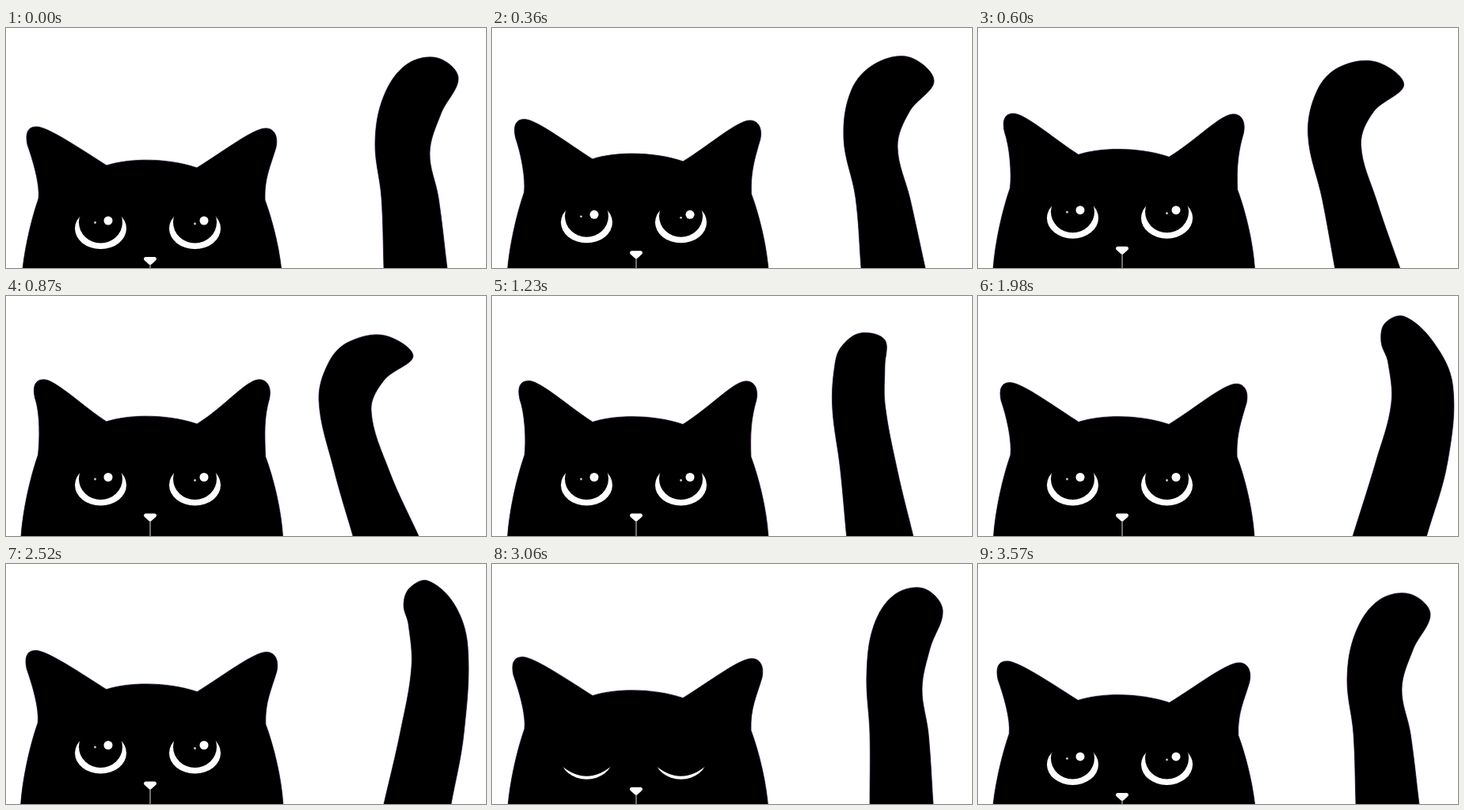
These frames come from a looping animation (606x304 px, 3.6 s). An HTML page with a canvas:

```html
<!DOCTYPE html>
<html lang="en">
<head>
<meta charset="utf-8">
<title>Peeking cat</title>
<style>
  html, body { margin: 0; width: 100%; height: 100%; overflow: hidden; background: #fff; }
  canvas { display: block; }
</style>
</head>
<body>
<canvas id="stage" width="606" height="304"></canvas>
<script>
const ctx = document.getElementById('stage').getContext('2d');
const LOOP = 3600, STEP = 30;

// Monotone cubic through keys, at rest at both ends.
function sample(times, vals, t) {
  const last = times.length - 1;
  const slope = i => (vals[i + 1] - vals[i]) / (times[i + 1] - times[i]);
  const tangent = i => {
    if (i === 0 || i === last) return 0;
    const a = slope(i - 1), b = slope(i);
    return a * b > 0 ? 2 * a * b / (a + b) : 0;
  };
  let i = 0;
  while (i < last - 1 && t >= times[i + 1]) i++;
  const h = times[i + 1] - times[i], u = (t - times[i]) / h, v = 1 - u;
  return v * v * (1 + 2 * u) * vals[i] + u * v * v * h * tangent(i)
       + u * u * (3 - 2 * u) * vals[i + 1] - u * u * v * h * tangent(i + 1);
}

// Tail outline: left base x, points up the left side, round the tip, down, right base x.
const rest = [477, 474,215, 466,145, 477,86, 506,46, 545,38, 571,63, 549,109, 535,158, 546,215, 557];
const poses = [
  rest,
  [466, 459,215, 444,140, 454,78, 484,45, 527,37, 558,67, 527,106, 512,150, 528,217, 547],
  [438, 414,220, 395,132, 408,83, 433,58, 478,50, 514,76, 477,107, 461,145, 484,222, 521],
  [461, 474,215, 478,150, 470,94, 456,68, 460,42, 488,33, 527,68, 547,128, 552,220, 548],
  [474, 503,210, 523,135, 519,82, 511,57, 516,34, 540,25, 577,58, 601,112, 594,210, 567],
  [477, 498,212, 512,130, 508,76, 502,52, 509,31, 532,21, 566,51, 583,105, 578,215, 562],
  [477, 477,215, 473,140, 482,78, 508,39, 545,31, 569,58, 553,107, 543,158, 551,215, 557],
  rest
];
const poseTimes = [0, 360, 870, 1560, 2040, 2520, 3060, LOOP];
const tracks = rest.map((_, i) => poses.map(p => p[i]));

const headTimes = [0, 360, 870, 1560, 2520, 3060, LOOP];
const earKeys = [0, .3, 1, .5, 0, 0, 0];
const breathKeys = [1, 1.003, 1.004, .996, 1.006, 1, 1.012];
const liftTimes = [0, 360, 720, 2520, 3060, LOOP];
const liftKeys = [0, -7.7, -14.5, -14.5, -7.3, 0];
const blinkTimes = [0, 2880, 3030, 3090, 3240, LOOP];
const blinkKeys = [0, 0, 1, 1, 0, 0];

function fur(path) {
  ctx.fillStyle = '#000';
  ctx.strokeStyle = '#230532';
  ctx.lineWidth = .7;
  ctx.fill(path);
  ctx.stroke(path);
}

function drawTail(t) {
  const v = tracks.map(track => sample(poseTimes, track, t));
  const pts = [[v[0], 304]];
  for (let i = 1; i < v.length - 1; i += 2) pts.push([v[i], v[i + 1]]);
  pts.push([v[v.length - 1], 304]);

  const path = new Path2D();
  const at = i => pts[Math.max(0, Math.min(pts.length - 1, i))];
  path.moveTo(v[0], 320);
  path.lineTo(...pts[0]);
  for (let i = 0; i < pts.length - 1; i++) {
    const [a, b, c, d] = [at(i - 1), at(i), at(i + 1), at(i + 2)];
    // Tangents scaled by chord length keep uneven spacing smooth.
    const len = (p, q) => Math.hypot(q[0] - p[0], q[1] - p[1]);
    const l0 = len(a, b), l1 = len(b, c), l2 = len(c, d);
    const k0 = l1 / (l0 + l1) / 3, k1 = l1 / (l1 + l2) / 3;
    const f0 = l0 ? k0 * 1.08 : k0, f1 = l2 ? k1 * 1.08 : k1;
    path.bezierCurveTo(
      b[0] + (c[0] - a[0]) * f0, b[1] + (c[1] - a[1]) * f0,
      c[0] - (d[0] - b[0]) * f1, c[1] - (d[1] - b[1]) * f1, c[0], c[1]);
  }
  path.lineTo(v[v.length - 1], 320);
  path.closePath();
  fur(path);
}

function drawHead(t) {
  const ear = sample(headTimes, earKeys, t);
  const breath = sample(headTimes, breathKeys, t);
  const left = (x, y) => `${x + 10 * ear},${y - 4 * ear} `;
  const right = (x, y) => `${x - 9 * ear},${y - 6 * ear} `;
  const path = new Path2D(
    'M18,340 L19.5,320 C22,285 31,245 41,216 ' +
    'C43,198 ' + left(34, 168) + left(27, 148) +
    'C' + left(24, 134) + left(27, 125) + left(38, 125) +
    'C' + left(52, 124) + '100,157 127,174 ' +
    'C158,164 206,165 241,177 ' +
    'C275,156 ' + right(312, 127) + right(328, 127) +
    'C' + right(338, 127) + right(344, 136) + right(341, 151) +
    'C' + right(334, 175) + '326,190 327,218 ' +
    'C337,245 347,285 349,320 L351,340 Z');
  ctx.save();
  ctx.translate(184, 290);
  ctx.scale(breath, breath);
  ctx.translate(-184, -290);
  fur(path);
  ctx.restore();
}

function oval(x, y, rx, ry, color) {
  ctx.fillStyle = color;
  ctx.beginPath();
  ctx.ellipse(x, y, rx, ry, 0, 0, 7);
  ctx.fill();
}

function drawEye(x, glintX, dotX, dotY, blink) {
  oval(x, 254, 32.5, 26, '#fff');
  oval(x, 246, 27.5, 26.5, '#000');
  oval(glintX, 244, 5.5, 5.5, '#fff');
  oval(dotX, dotY, 1.4, 1.4, '#ccc');
  if (blink <= 0) return;
  const edge = 222 + 38 * blink, dip = 222 + 70 * blink;
  ctx.fillStyle = '#000';
  ctx.fill(new Path2D(`M${x - 35},210 V${edge} Q${x},${dip} ${x + 35},${edge} V210 Z`));
}

const nose = new Path2D('M176,290 H188 Q191,291 189.5,294 L184,299 Q182,301 180,299 L174.5,294 Q173,291 176,290 Z');

function drawFace(t) {
  const blink = sample(blinkTimes, blinkKeys, t);
  drawEye(119.5, 129, 112.5, 246.5, blink);
  drawEye(238.5, 250, 238.5, 248, blink);
  ctx.fillStyle = '#fff';
  ctx.fill(nose);
  ctx.fillStyle = '#ddd';
  ctx.fillRect(181.5, 299, 1, 40);
}

function draw(now) {
  const t = Math.floor(now % LOOP / STEP) * STEP;
  ctx.fillStyle = '#fff';
  ctx.fillRect(0, 0, 606, 304);
  drawTail(t);
  ctx.save();
  ctx.translate(0, sample(liftTimes, liftKeys, t));
  drawHead(t);
  drawFace(t);
  ctx.restore();
}

let start;
function tick(now) {
  start ??= now;
  draw(now - start);
  requestAnimationFrame(tick);
}
draw(0);
requestAnimationFrame(tick);
</script>
</body>
</html>
```
